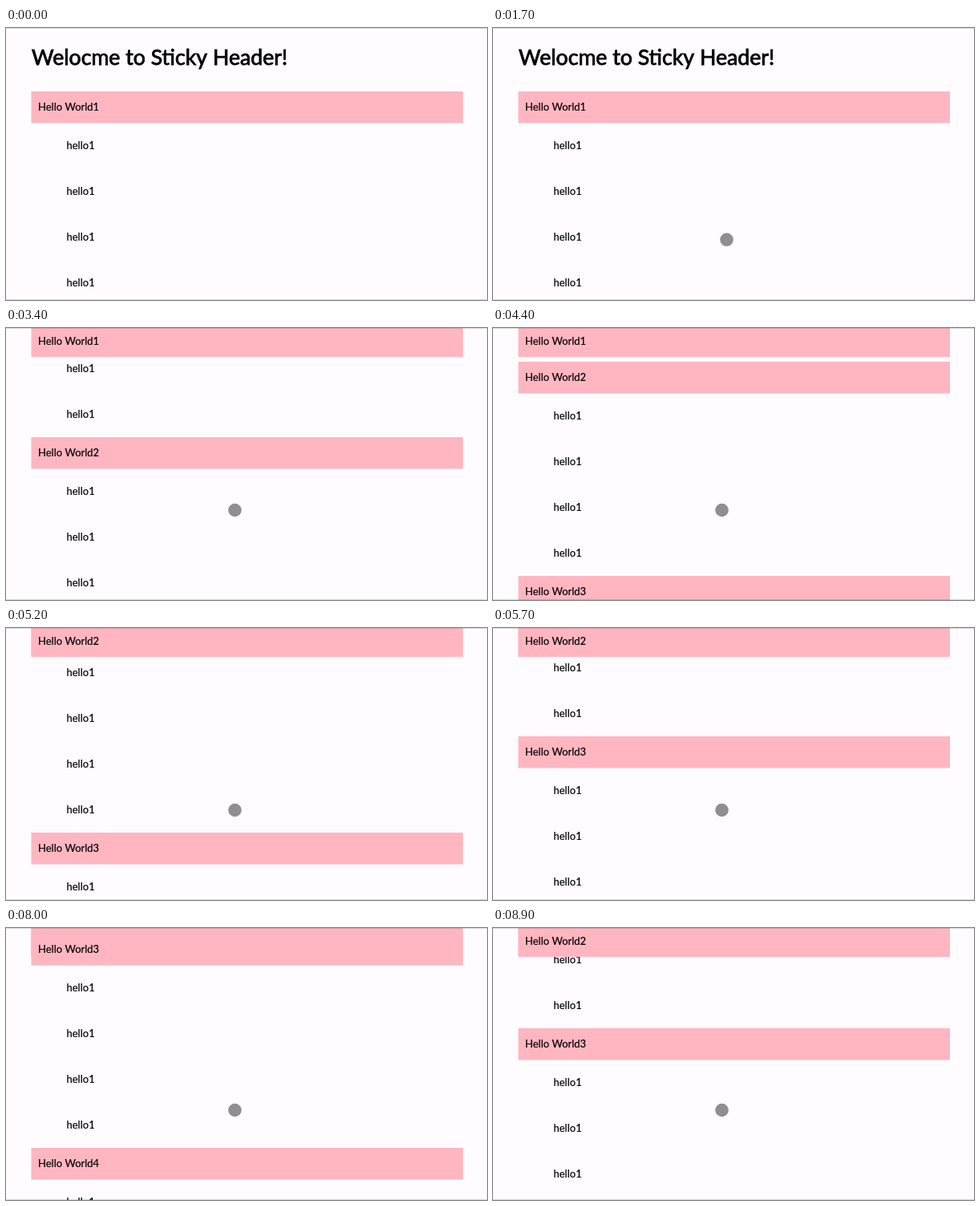
An HTML page with a canvas that plays this animation: 600 px wide and 339 px high, repeating every 9000 ms.

```html
<!DOCTYPE html>
<html lang="en">
<meta charset="utf-8">
<title>Sticky Header</title>
<style>
  html, body { margin: 0; width: 100%; height: 100%; overflow: hidden; background: #fefcff; }
  canvas { display: block; }
</style>
<canvas id="stage" width="600" height="339"></canvas>
<script>
const ctx = document.getElementById('stage').getContext('2d');
const LOOP = 9000, STEP = 100;
const SECTION = 267, ITEM = 57, FIRST = 79, STUCK = -3.5;

// Scroll gestures: start, end, scroll from, scroll to, steepness
const gestures = [
  [2200, 3200, 0, 209, 1.3],
  [3200, 3400, 209, 210, 1],
  [3700, 4400, 210, 304, 2],
  [4800, 5800, 304, 480, 2],
  [6100, 7600, 480, 612, 2.5],
  [7800, 8900, 612, 488, 2],
];

function ease(p, k) {
  const a = p ** k, b = (1 - p) ** k;
  return a / (a + b);
}

function scrollAt(t) {
  let s = 0;
  for (const [start, end, from, to, k] of gestures) {
    if (t < start) break;
    const p = Math.min(1, (t - start) / (end - start));
    s = from + (to - from) * ease(p, k);
  }
  return Math.round(s);
}

function text(str, x, y, size, weight) {
  ctx.font = `${size}px Lato, sans-serif`;
  ctx.lineWidth = weight;
  ctx.fillStyle = ctx.strokeStyle = '#000';
  ctx.fillText(str, x, y);
  ctx.strokeText(str, x, y);
}

function pointer(t) {
  if (t < 1600) return;
  const left = Math.max(0, (1800 - t) / 200);
  ctx.fillStyle = '#918e92';
  ctx.beginPath();
  ctx.arc(285.5 + 17 * left ** 1.5, 227 + 104 * left ** 1.5, 8.3, 0, 7);
  ctx.fill();
}

function draw(t) {
  const s = scrollAt(t);
  ctx.fillStyle = '#fefcff';
  ctx.fillRect(0, 0, 600, 339);
  text('Welocme to Sticky Header!', 32, 46 - s, 26.7, 0.8);

  const tops = [0, 1, 2, 3].map(i => FIRST + SECTION * i - s);
  for (const top of tops)
    for (let j = 0; j < 4; j++) text('hello1', 75.5, top + 72 + ITEM * j, 13, 0.2);

  tops.forEach((top, i) => {
    const y = Math.max(STUCK, top);
    ctx.fillStyle = '#ffb6c1';
    ctx.fillRect(31.5, y, 538.5, 39.5);
    text('Hello World' + (i + 1), 40, y + 24, 13, 0.2);
  });

  ctx.fillStyle = 'rgba(0, 0, 0, .15)';
  ctx.fillRect(0, 0, 600, 1);
  ctx.fillRect(0, 338, 600, 1);
  pointer(t);
}

function frame() {
  const t = performance.now() % LOOP;
  draw(Math.floor(t / STEP) * STEP);
  requestAnimationFrame(frame);
}
frame();
</script>
</html>
```
